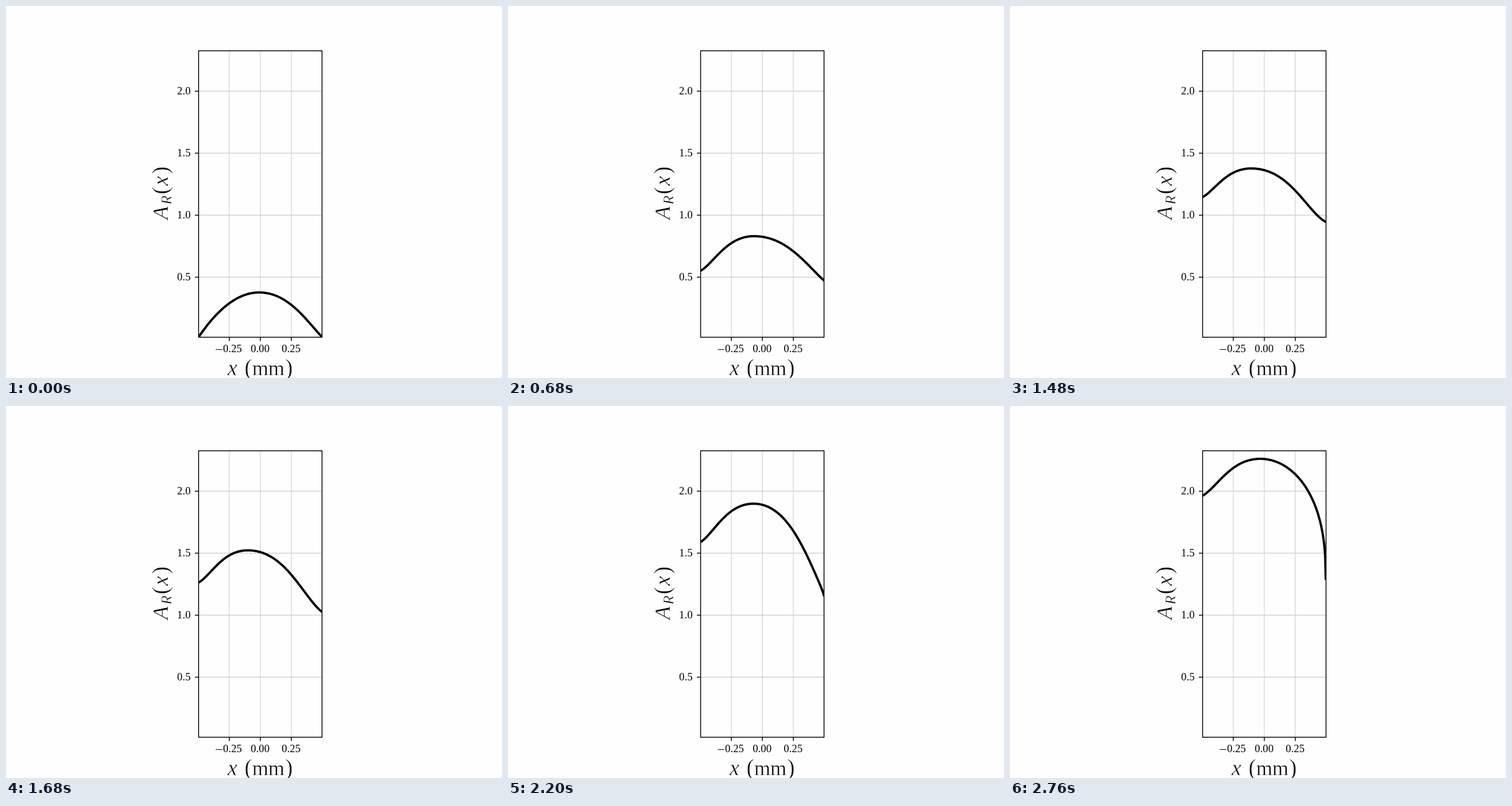
Write an HTML page that moves like this. It is 864 px wide and 648 px high and loops after 2.8 s.

```html
<!DOCTYPE html>
<html lang="en">
<head>
<meta charset="utf-8">
<title>Profile over time</title>
<style>
  html, body { margin: 0; width: 100%; height: 100%; overflow: hidden; background: #fefefe; }
  svg { display: block; width: 864px; height: 648px; }
  text { font-family: "Liberation Serif", "Times New Roman", serif; fill: #000; }
  .tick { font-size: 18.75px; }
  .label { stroke: #fefefe; stroke-width: 0.6; }
  .it { font-style: italic; font-size: 38px; }
  .rm { font-size: 36px; }
  .par { font-size: 39px; }
  .sub { font-style: italic; font-size: 26px; }
  .grid { stroke: #cacaca; stroke-width: 1.1; }
  .mark { stroke: #000; stroke-width: 1.5; }
</style>
</head>
<body>
<svg viewBox="0 0 864 648">
  <defs><clipPath id="box"><rect x="335.5" y="78" width="215" height="499"/></clipPath></defs>
  <g id="axes"></g>
  <path id="curve" clip-path="url(#box)" fill="none" stroke="#000" stroke-width="4" stroke-linejoin="round" stroke-linecap="square"/>
  <rect x="335.5" y="78" width="215" height="499" fill="none" stroke="#000" stroke-width="1.5"/>
  <g class="label">
    <text class="it" x="386" y="642.5">x</text>
    <text class="par" x="415.5" y="642.5">(</text>
    <text class="rm" x="429" y="642.5">mm</text>
    <text class="par" x="486.5" y="642.5">)</text>
  </g>
  <g class="label" transform="translate(282 373) rotate(-90)">
    <text class="it" x="1" y="0">A</text>
    <text class="sub" x="27" y="5.5">R</text>
    <text class="par" x="45" y="0">(</text>
    <text class="it" x="60" y="0">x</text>
    <text class="par" x="80.5" y="0">)</text>
  </g>
</svg>
<script>
const LOOP = 2800, STEP = 40, LEFT = 336, RIGHT = 550;

// the peak and both ends of the curve; "power" below 1 steepens the right edge
const keys = [
  { t: 0,    left: 576,   peak: 441, top: 499,   right: 576, bend: 0.5, power: 1 },
  { t: 1040, left: 400,   peak: 422, top: 349,   right: 426, bend: 0.6, power: 1 },
  { t: 1480, left: 332.5, peak: 420, top: 283,   right: 376, bend: 1.3, power: 1 },
  { t: 1920, left: 277,   peak: 423, top: 213.5, right: 337, bend: 0.8, power: 1 },
  { t: 2440, left: 202,   peak: 432, top: 133,   right: 323, bend: 1.1, power: 0.6 },
  { t: 2760, left: 156,   peak: 436, top: 92,    right: 301, bend: 0,   power: 0.41 }
];

const mix = (a, b, k) => a + (b - a) * k;
const axes = document.getElementById("axes");
const curve = document.getElementById("curve");

function add(tag, attrs, label = "") {
  const el = document.createElementNS("http://www.w3.org/2000/svg", tag);
  for (const key in attrs) el.setAttribute(key, attrs[key]);
  el.textContent = label;
  axes.append(el);
}
const line = (cls, x1, y1, x2, y2) => add("line", { class: cls, x1, y1, x2, y2 });

for (const v of [-0.25, 0, 0.25]) {
  const x = 443 + v * 216;
  line("grid", x, 78, x, 577);
  line("mark", x, 577, x, 583.5);
  add("text", { class: "tick", x: x + (v < 0 ? 5.5 : -0.3), y: 603.3, "text-anchor": "middle" }, Math.abs(v).toFixed(2));
}
// wide minus sign of the first label
add("line", { x1: 365.3, x2: 376.8, y1: 598.5, y2: 598.5, stroke: "#000" });
for (const v of [0.5, 1, 1.5, 2]) {
  const y = 580.4 - v * 216;
  line("grid", 335.5, y, 550.5, y);
  line("mark", 329, y, 335.5, y);
  add("text", { class: "tick", x: 321.5, y: y + 6, "text-anchor": "end" }, v.toFixed(1));
}

function poseAt(t) {
  const i = Math.max(1, keys.findIndex(key => key.t >= t));
  const a = keys[i - 1], b = keys[i], k = (t - a.t) / (b.t - a.t);
  const pose = {};
  for (const name in a) pose[name] = mix(a[name], b[name], k);
  return pose;
}

// falls from 0 at the peak to 1 at the end: a parabola with a soft bend
const fall = (s, bend) => s * s * (1 + bend * s * s * (1 - s));

function draw(t) {
  const p = poseAt(t), leftBend = Math.min(1.1, t / 500);
  const pts = [];
  for (let x = LEFT; x <= RIGHT; x++) {
    const drop = x < p.peak
      ? (p.left - p.top) * fall((p.peak - x) / (p.peak - LEFT), leftBend)
      : (p.right - p.top) * (1 - (1 - fall((x - p.peak) / (RIGHT - p.peak), p.bend)) ** p.power);
    pts.push(`${x},${(p.top + drop).toFixed(2)}`);
  }
  curve.setAttribute("d", "M" + pts.join("L"));
}

function tick() {
  draw(Math.floor(performance.now() % LOOP / STEP) * STEP);
  requestAnimationFrame(tick);
}
tick();
</script>
</body>
</html>
```
